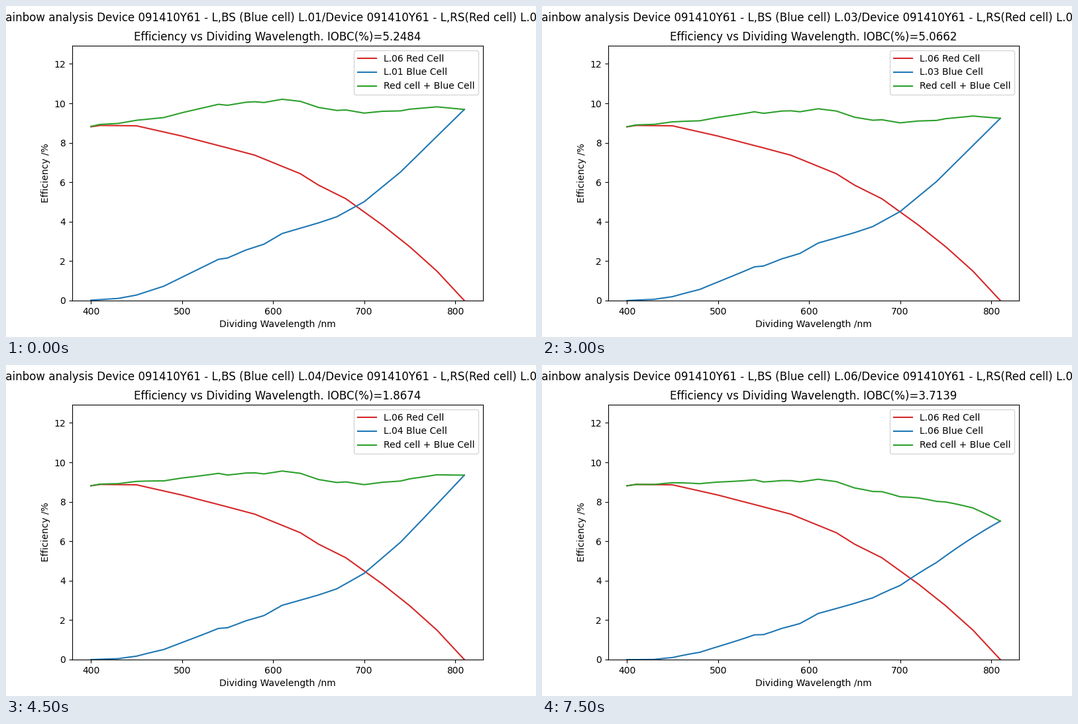
A matplotlib script for the animation above (8 s loop, 800x500 px).

```python
import numpy as np
import matplotlib.pyplot as plt
from matplotlib.animation import FuncAnimation

STEP_MS = 500
STEPS_PER_CELL = 3
STEPS = 16

# Keeps glyph advances true to size at 100 dpi.
plt.rcParams["text.hinting_factor"] = 9

wavelength = np.arange(400, 811, 10)


def through(*points):
    x, y = zip(*points)
    return np.interp(wavelength, x, y)


red = through((400, 8.81), (410, 8.88), (450, 8.86), (500, 8.34), (550, 7.74),
              (580, 7.37), (630, 6.43), (650, 5.85), (680, 5.16), (720, 3.83),
              (750, 2.73), (780, 1.49), (810, 0))

best_blue = through((400, 0.02), (430, 0.11), (450, 0.28), (480, 0.73),
                    (540, 2.09), (550, 2.16), (570, 2.56), (590, 2.86),
                    (610, 3.40), (650, 3.94), (670, 4.25), (700, 5.01),
                    (740, 6.52), (810, 9.69))

# Each blue cell loses efficiency past 500 nm and again in the far red.
mid_loss = 1 / (1 + np.exp((503 - wavelength) / 32))
far_loss = np.clip((wavelength - 650) / 160, 0, 1) ** 2

# (IOBC, mid loss, far loss)
cells = [
    (5.2484, 0, 0),
    (5.1244, 0.21, -0.02),
    (5.0662, 0.50, -0.05),
    (1.8674, 0.67, -0.33),
    (1.8085, 0.74, -0.36),
    (3.7139, 1.10, 1.57),
]

fig, ax = plt.subplots(figsize=(8, 5), dpi=100)
heading = fig.suptitle("", y=0.982)
title = ax.set_title("")
ax.plot(wavelength, red, color="tab:red", label="L.06 Red Cell")
blue_line, = ax.plot(wavelength, best_blue, color="tab:blue",
                     label="L.01 Blue Cell")
sum_line, = ax.plot(wavelength, red + best_blue, color="tab:green",
                    label="Red cell + Blue Cell")
ax.set_xlim(379.5, 830.5)
ax.set_ylim(0, 12.92)
ax.set_xlabel("Dividing Wavelength /nm")
ax.set_ylabel("Efficiency /%")
legend = ax.legend(loc="upper right")


def update(step):
    cell = step // STEPS_PER_CELL
    iobc, mid, far = cells[cell]
    name = f"L.{cell + 1:02d}"
    blue = np.maximum(best_blue - mid * mid_loss - far * far_loss, 0)
    blue_line.set_ydata(blue)
    sum_line.set_ydata(red + blue)
    legend.get_texts()[1].set_text(f"{name} Blue Cell")
    heading.set_text(f"Rainbow analysis Device 091410Y61 - L,BS (Blue cell) {name}"
                     "/Device 091410Y61 - L,RS(Red cell) L.06")
    title.set_text(f"Efficiency vs Dividing Wavelength. IOBC(%)={iobc:.4f}")
    return blue_line, sum_line, heading, title, legend


anim = FuncAnimation(fig, update, frames=STEPS, interval=STEP_MS,
                     repeat=True, repeat_delay=0, blit=False)
plt.show()
```
